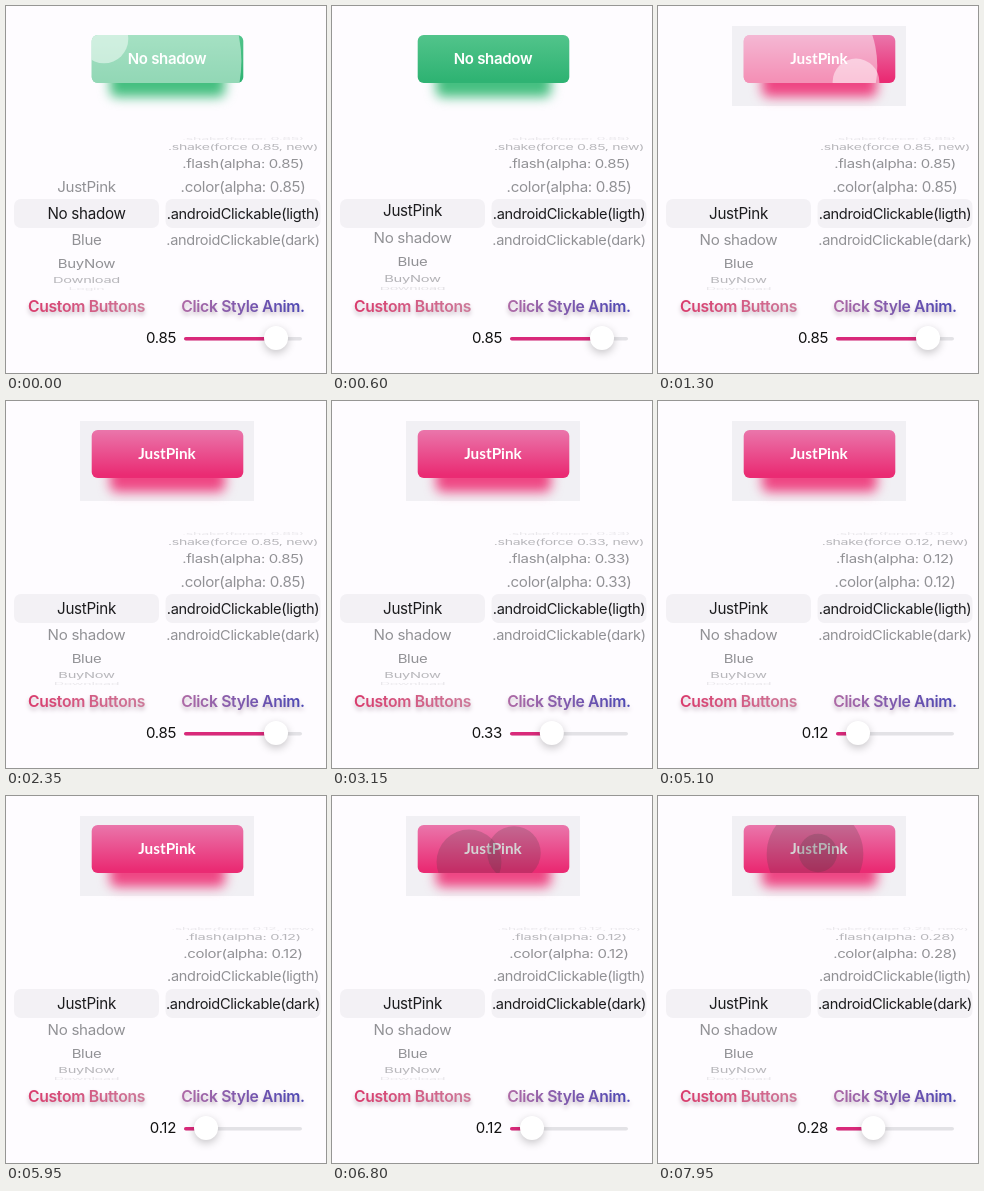
An HTML page with a canvas that plays this animation: 320 by 367 pixels, repeating every 8000 ms.

```html
<!DOCTYPE html>
<html lang="en">
<head>
<meta charset="utf-8">
<title>Button click styles</title>
<style>
  html, body { margin: 0; width: 100%; height: 100%; overflow: hidden; background: #fefcff; }
  canvas { display: block; width: 320px; height: 367px; }
</style>
</head>
<body>
<canvas id="stage"></canvas>
<script>
const LOOP = 8000, W = 320, H = 367;
const FONT = 'Inter, Roboto, sans-serif';
const canvas = document.getElementById('stage');
const ctx = canvas.getContext('2d');
const dpr = window.devicePixelRatio || 1;
canvas.width = W * dpr;
canvas.height = H * dpr;

const SWAP = 750;         // the button takes on the picked style
const RIPPLE_LIFE = 600, RIPPLE_SPEED = 0.3;
const STYLES = {
  green: { label: 'No shadow', font: '600 15px ' + FONT, spacing: '-0.3px', top: '#52c48b', bottom: '#2fb373', shadow: '#45bf80' },
  pink: { label: 'JustPink', font: '700 15.3px Lato, sans-serif', spacing: '0px', top: '#ea76ab', bottom: '#ea2b73', shadow: '#ee4683' }
};

// [start, x, y] of every tap
const TAPS = [
  [-417, 110, 55], [-80, 98, 33],
  [970, 120, 60], [1223, 198, 76], [1450, 130, 48], [1680, 170, 58],
  [3792, 165, 65], [3980, 140, 50], [4180, 190, 60], [4390, 150, 55],
  [6000, 130, 50], [6190, 175, 62], [6693, 137, 66], [6712, 182, 57],
  [7790, 157, 58], [7887, 160, 57]
];
const DARK_FROM = 5500;

const clamp = v => Math.min(1, Math.max(0, v));
function ease(t, from, to) {
  const p = clamp((t - from) / (to - from));
  return p * p * (3 - 2 * p);
}

function sliderValue(t) {
  return 0.85 - 0.73 * ease(t, 2450, 3530) + 0.16 * ease(t, 6980, 7560);
}

function box(x, y, w, h, r) {
  ctx.beginPath();
  ctx.roundRect(x, y, w, h, r);
}

function text(str, x, y, font, fill, align = 'center') {
  ctx.font = font;
  ctx.fillStyle = fill;
  ctx.textAlign = align;
  ctx.fillText(str, x, y);
}

function gradient(x0, y0, x1, y1, from, to) {
  const g = ctx.createLinearGradient(x0, y0, x1, y1);
  g.addColorStop(0, from);
  g.addColorStop(1, to);
  return g;
}

function drawRipples(t) {
  for (const [start, x, y] of TAPS) {
    const age = t - start;
    if (age < 0 || age > RIPPLE_LIFE || (start < SWAP && t >= SWAP)) continue;
    const fade = clamp((1 - age / RIPPLE_LIFE) / 0.3);
    ctx.fillStyle = start > DARK_FROM ? `rgba(60,60,60,${0.22 * fade})` : `rgba(255,255,255,${0.48 * fade})`;
    ctx.beginPath();
    ctx.arc(x, y, age * RIPPLE_SPEED, 0, 2 * Math.PI);
    ctx.fill();
  }
}

function drawButton(t) {
  const style = t < SWAP ? STYLES.green : STYLES.pink;
  if (style === STYLES.pink) {
    ctx.fillStyle = '#f1f0f4';
    ctx.fillRect(74, 20, 174, 80);
  }
  ctx.save();
  ctx.filter = `blur(${6 * dpr}px)`;
  ctx.fillStyle = style.shadow;
  box(104, 59, 115, 32, 6);
  ctx.fill();
  ctx.restore();

  ctx.save();
  box(85.7, 29, 151.6, 48, 6);
  ctx.fillStyle = gradient(0, 29, 0, 74, style.top, style.bottom);
  ctx.fill();
  ctx.clip();
  ctx.letterSpacing = style.spacing;
  text(style.label, 161, 53, style.font, '#fff');
  drawRipples(t);
  ctx.restore();
}

// Rows lie on a cylinder seen from the front, with slight perspective
function drawRows(rows, cx, position, color) {
  const radius = 82, step = 0.335, distance = 1000;
  rows.forEach((row, i) => {
    const angle = (i - position) * step;
    if (Math.abs(angle) > 1.45) return;
    const depth = radius * (1 - Math.cos(angle));
    const scale = distance / (distance + depth);
    const size = row.length > 20 ? 14.6 : 15.2;
    ctx.save();
    ctx.translate(cx, 208.2 + radius * Math.sin(angle) * scale);
    ctx.scale(scale, scale * Math.cos(angle));
    ctx.globalAlpha = clamp(Math.cos(angle) * 1.5 - 0.15);
    text(row, 0, 0, `${size}px ${FONT}`, color);
    ctx.restore();
  });
}

function drawPicker(rows, x, width, position) {
  const cx = x + width / 2;
  box(x, 193, width, 29, 7);
  ctx.fillStyle = '#f3f1f5';
  ctx.fill();

  ctx.save();
  ctx.beginPath();
  ctx.rect(0, 120, W, 73);
  ctx.rect(0, 222, W, 64);
  ctx.clip();
  drawRows(rows, cx, position, '#919195');
  ctx.restore();

  ctx.save();
  ctx.beginPath();
  ctx.rect(0, 193, W, 29);
  ctx.clip();
  drawRows(rows, cx, position, '#1c1c1e');
  ctx.restore();
}

function drawTitles() {
  const font = '600 15.7px ' + FONT;
  ctx.save();
  ctx.shadowColor = 'rgba(90,50,80,0.32)';
  ctx.shadowBlur = 4 * dpr;
  ctx.shadowOffsetY = 3 * dpr;
  text('Custom Buttons', 80.5, 301.4, font, gradient(22, 0, 139, 0, '#d93c6d', '#cd7a9a'));
  text('Click Style Anim.', 237, 301.4, font, gradient(176, 0, 298, 0, '#ae6aa6', '#4c48b4'));
  ctx.restore();
}

function drawSlider(value) {
  const knob = 188.5 + 95.9 * value;
  text(value.toFixed(2), 170, 332.8, '15px ' + FONT, '#111', 'right');
  box(178, 331, 118, 3.6, 1.8);
  ctx.fillStyle = '#e3e2e6';
  ctx.fill();
  box(178, 331, knob - 178, 3.6, 1.8);
  ctx.fillStyle = '#d9297a';
  ctx.fill();
  ctx.save();
  ctx.shadowColor = 'rgba(0,0,0,0.22)';
  ctx.shadowBlur = 8 * dpr;
  ctx.shadowOffsetY = 3 * dpr;
  ctx.beginPath();
  ctx.arc(knob, 332, 12, 0, 2 * Math.PI);
  ctx.fillStyle = '#fff';
  ctx.fill();
  ctx.restore();
}

function draw(t) {
  ctx.setTransform(dpr, 0, 0, dpr, 0, 0);
  ctx.textBaseline = 'middle';
  ctx.letterSpacing = '-0.3px';
  ctx.fillStyle = '#fefcff';
  ctx.fillRect(0, 0, W, H);

  const value = sliderValue(t), v = value.toFixed(2);
  drawButton(t);
  drawPicker(['JustPink', 'No shadow', 'Blue', 'BuyNow', 'Download', 'Login'], 8, 145, 1 - ease(t, 200, 700));
  drawPicker([
    `.shake(force: ${v})`, `.shake(force ${v}, new)`, `.flash(alpha: ${v})`,
    `.color(alpha: ${v})`, '.androidClickable(ligth)', '.androidClickable(dark)'
  ], 159.5, 155, 4 + ease(t, 5300, 5850));
  drawTitles();
  drawSlider(value);
}

const began = performance.now();
function tick() {
  draw((performance.now() - began) % LOOP);
  requestAnimationFrame(tick);
}
tick();
</script>
</body>
</html>
```
